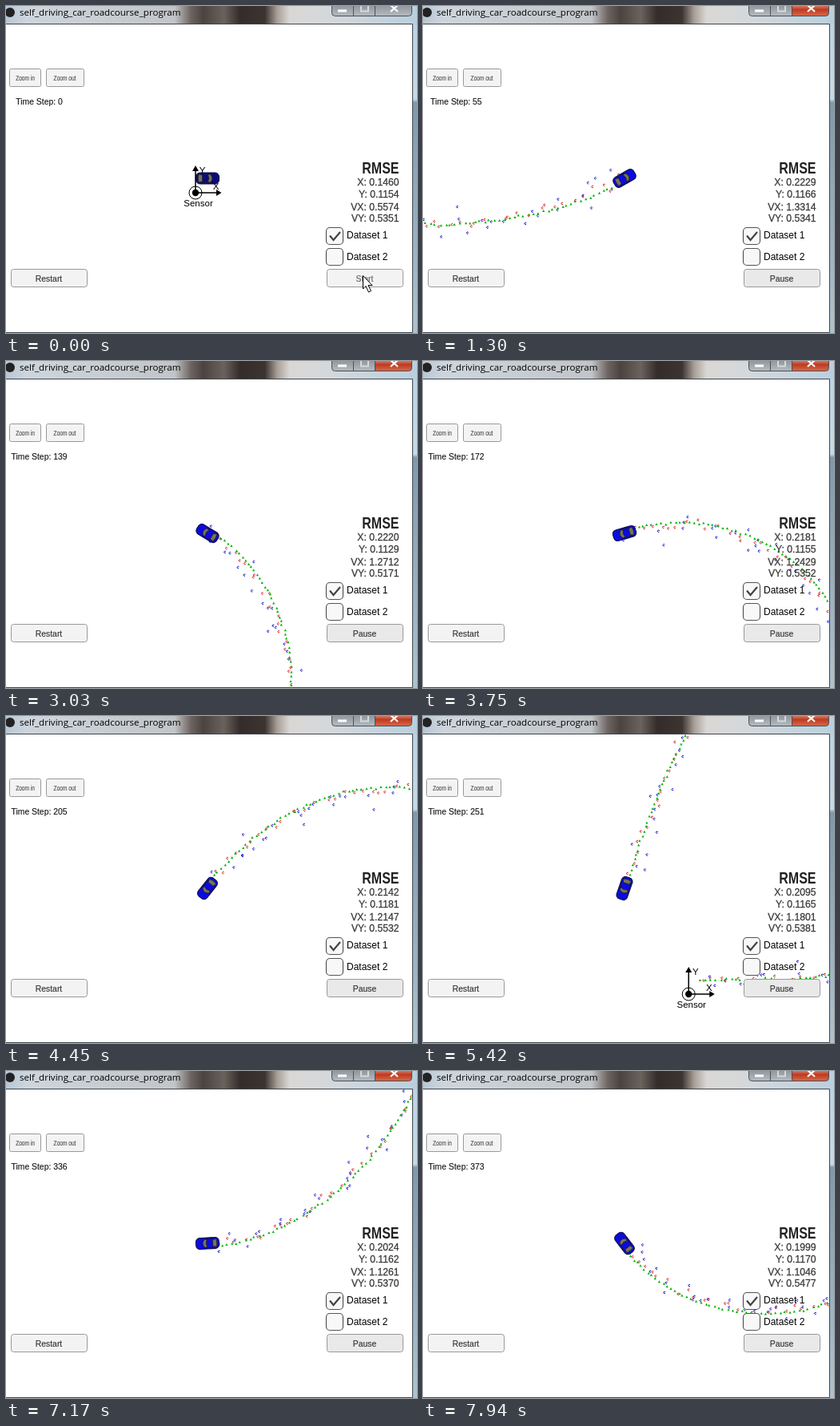
An HTML page for the animation above (7.99 s loop, 514 px wide and 408 px high).

```html
<!DOCTYPE html>
<html lang="en">
<head>
<meta charset="utf-8">
<title>Sensor fusion simulator</title>
<style>
  html, body { margin: 0; width: 100%; height: 100%; overflow: hidden; background: #fff; }
  svg { display: block; width: 514px; height: 408px; }
  text { font-family: "Liberation Sans", Arial, sans-serif; }
  .title { font: 11.6px "Open Sans", "Noto Sans", sans-serif; }
  .label { font-size: 10.4px; fill: #333; stroke: #333; stroke-width: .15; text-anchor: middle; }
  .small { font-size: 9.4px; fill: #505050; stroke: #505050; stroke-width: .15; text-anchor: middle; }
  .stat { font-size: 13.7px; fill: #3a3a3a; stroke: #3a3a3a; stroke-width: .3; text-anchor: end; }
  .set { font-size: 12px; }
  .btn { fill: #f3f3f3; stroke: #999; }
  .box { fill: #f8f8f8; stroke: #555; stroke-width: 1.2; }
  .dot { fill: none; stroke-width: 1; }
</style>
</head>
<body>
<svg viewBox="0 0 514 408" xmlns="http://www.w3.org/2000/svg">
  <defs>
    <linearGradient id="glass">
      <stop offset="0" stop-color="#b7c6d4"/>
      <stop offset=".05" stop-color="#cdd5dc"/>
      <stop offset=".41" stop-color="#c2c5c8"/>
      <stop offset=".45" stop-color="#6d6460"/>
      <stop offset=".48" stop-color="#4b4340"/>
      <stop offset=".53" stop-color="#6b625d"/>
      <stop offset=".57" stop-color="#332c2a"/>
      <stop offset=".63" stop-color="#3c3431"/>
      <stop offset=".66" stop-color="#a89f98"/>
      <stop offset=".69" stop-color="#d9d7d5"/>
      <stop offset=".79" stop-color="#d4d8db"/>
      <stop offset="1" stop-color="#b9cfde"/>
    </linearGradient>
    <linearGradient id="edge" x2="0" y2="1">
      <stop offset="0" stop-color="#b9d2e4"/>
      <stop offset=".285" stop-color="#c6d9e6"/>
      <stop offset=".295" stop-color="#7f99ac"/>
      <stop offset="1" stop-color="#afc2cf"/>
    </linearGradient>
    <linearGradient id="red" x2="0" y2="1">
      <stop offset="0" stop-color="#d98873"/>
      <stop offset=".4" stop-color="#bd3b22"/>
      <stop offset="1" stop-color="#d8694a"/>
    </linearGradient>
    <linearGradient id="grey" x2="0" y2="1">
      <stop offset="0" stop-color="#8e959b"/>
      <stop offset="1" stop-color="#b5bbc0"/>
    </linearGradient>
    <clipPath id="view"><path d="M0 23H508V407H0z"/></clipPath>
  </defs>

  <rect width="514" height="408" fill="url(#edge)"/>
  <rect width="514" height="23" fill="url(#glass)"/>
  <circle cx="5" cy="8" r="6" fill="#222"/>
  <text class="title" x="17" y="12">self_driving_car_roadcourse_program</text>

  <g stroke="#4b5157">
    <path d="M407.5 -1H434.5V12.5H411.5Q407.5 12.5 407.5 8.5z" fill="url(#grey)"/>
    <path d="M434.5 -1H461.5V12.5H434.5z" fill="url(#grey)"/>
    <path id="close" d="M461.5 -1H507.5V8.5Q507.5 12.5 503.5 12.5H461.5z"/>
  </g>
  <path d="M415 6h11" stroke="#fff" stroke-width="3"/>
  <path d="M444 -1V6.5h9V-1" fill="none" stroke="#d5d9dc" stroke-width="2"/>
  <path d="M481 -1l9 8m0 -8l-9 8" stroke="#fff" stroke-width="2.2"/>

  <path d="M0 23H508V407H0z" fill="#fff"/>
  <path d="M0 22.5H508.5V407.5H0" fill="none" stroke="#3f474d"/>

  <g clip-path="url(#view)">
    <g id="world">
      <path id="radar" class="dot" stroke="#0000c8"/>
      <path id="lidar" class="dot" stroke="#d01010"/>
      <path id="track" fill="#00b400"/>
    </g>
    <g id="car">
      <rect id="body" x="-14.5" y="-7" width="29" height="14" rx="5" stroke="#0a0a40"/>
      <path d="M3 -5.5Q9 0 3 5.5L.5 4Q3 0 .5 -4zM-11 -5Q-12.500 0 -11 5L-6.500 4V-4z" fill="#77725c" stroke="#222" stroke-width=".8"/>
      <path d="M-8 -5.500H4M-8 5.500H4" stroke="#15154a"/>
    </g>
    <g id="sensor">
      <circle r="8" fill="none" stroke="#000"/>
      <circle r="4.2"/>
      <path d="M0 0V-29M0 0H28" stroke="#000" stroke-width="1.5"/>
      <path d="M-4 -27L0 -34L4 -27zM26 -4L32.5 0L26 4z"/>
      <text x="8.5" y="-24" font-size="11.5" text-anchor="middle">Y</text>
      <text x="25.5" y="-4" font-size="11.5" text-anchor="middle">X</text>
      <text x="3.5" y="17" font-size="11.5" text-anchor="middle">Sensor</text>
    </g>
  </g>

  <rect class="btn" x="4.5" y="78.5" width="39" height="22" rx="2"/>
  <rect class="btn" x="50.5" y="78.5" width="47" height="22" rx="2"/>
  <text class="small" transform="translate(24 92.5) scale(.7 1)">Zoom in</text>
  <text class="small" transform="translate(73.5 92.5) scale(.7 1)">Zoom out</text>
  <text id="clock" class="label" x="41.5" y="123" style="fill:#111"></text>

  <rect class="btn" x="6.5" y="328.5" width="95" height="22" rx="3"/>
  <text class="label" x="53.5" y="344">Restart</text>
  <rect id="runBox" class="btn" x="401.5" y="328.5" width="95" height="22" rx="3"/>
  <text id="run" class="label" x="448.5" y="344"></text>

  <text transform="translate(491.5 209) scale(.8 1)" font-size="20" font-weight="700" text-anchor="end" fill="#222">RMSE</text>
  <g id="stats"></g>

  <rect class="box" x="400.5" y="276.5" width="21" height="21" rx="4.5"/>
  <rect class="box" x="400.5" y="302.5" width="21" height="21" rx="4.5"/>
  <path d="M405 286.500l4.500 5.500l8.500 -10" fill="none" stroke="#444" stroke-width="2.2"/>
  <text class="set" x="426" y="290">Dataset 1</text>
  <text class="set" x="426" y="317">Dataset 2</text>

  <path id="cursor" d="M446.5 336.5V353L450 349.5L453.5 357L456.5 355.5L453 348.5H458z" fill="#fff" stroke="#000"/>
</svg>

<script>
const LOOP = 7990, TICK = 64.4;
const CX = 252, CY = 215;
const SCALE = 24, DT = 0.05, STEPS = 380;
const $ = id => document.getElementById(id);

// tick, time step, RMSE of x, y, vx, vy
const KNOTS = [
  [0, 0, .1460, .1154, .5574, .5351],
  [2, 0, .1460, .1154, .5574, .5351],
  [5, 9, .2480, .1090, 1.7200, .5200],
  [20, 55, .2229, .1166, 1.3314, .5341],
  [47, 139, .2220, .1129, 1.2712, .5171],
  [69, 205, .2142, .1181, 1.2147, .5532],
  [84, 251, .2095, .1165, 1.1801, .5381],
  [99, 298, .2048, .1154, 1.1477, .5263],
  [123, 373, .1999, .1170, 1.1046, .5477],
  [124, 376, .1997, .1170, 1.1030, .5470]
];

function sample(tick) {
  let i = 1;
  while (i < KNOTS.length - 1 && KNOTS[i][0] < tick) i++;
  const a = KNOTS[i - 1], b = KNOTS[i];
  const f = (tick - a[0]) / (b[0] - a[0]);
  return a.map((v, j) => v + (b[j] - v) * f);
}

// Figure eight: yaw rate .55 sin(wk), speed 5 + .2 cos(2wk)
const W = 2 * Math.PI / 500, LEAD = 0.7;
const yaw = k => 0.55 * DT / W * (1 - Math.cos(W * (k + LEAD)));
const poses = [];
for (let k = 0, x = 15, y = -18; k <= STEPS; k++) {
  poses.push({ x, y });
  const m = k + 0.5, d = (5 + 0.2 * Math.cos(2 * W * m)) * DT * SCALE;
  x += d * Math.cos(yaw(m));
  y -= d * Math.sin(yaw(m));
}

let seed = 7;
const rand = () => (seed = (seed * 16807) % 2147483647) / 2147483647;
const noise = s => s * (rand() + rand() + rand() + rand() - 2) * 1.73;
const ring = (x, y) => `M${x.toFixed(1)} ${y.toFixed(1)}m.8 1a1.2 1.2 0 1 1 .3-1.4`;
const wedge = (x, y) => `M${x.toFixed(1)} ${(y - 1.6).toFixed(1)}l1.6 3h-3.2z`;

// The estimate drifts to the outside of each bend
const marks = { track: [], lidar: [], radar: [] };
poses.forEach(({ x, y }, k) => {
  const out = 4 * Math.sin(W * k), a = yaw(k);
  marks.track.push(wedge(x + out * Math.sin(a) + noise(0.8), y + out * Math.cos(a) + noise(0.8)));
  const odd = k % 2, s = odd ? 8 : 3.6;
  marks[odd ? 'radar' : 'lidar'].push(ring(x + noise(s), y + noise(s)));
});

const stats = ['X', 'Y', 'VX', 'VY'].map((name, i) => {
  const el = document.createElementNS('http://www.w3.org/2000/svg', 'text');
  el.setAttribute('class', 'stat');
  el.setAttribute('transform', `translate(491.5 ${[223.5, 238.5, 255, 269][i]}) scale(.89 1)`);
  $('stats').append(el);
  return { name, el };
});

const move = (id, x, y, turn = 0) =>
  $(id).setAttribute('transform', `translate(${x.toFixed(2)} ${y.toFixed(2)}) rotate(${turn.toFixed(2)})`);

function draw(tick) {
  const [, raw, ...rmse] = sample(tick);
  const k = Math.round(raw), p = poses[k], on = tick > 0;

  move('world', CX - p.x, CY - p.y);
  move('sensor', CX - p.x, CY - p.y);
  move('car', CX, CY, -yaw(k) * 180 / Math.PI);
  $('body').setAttribute('fill', k ? '#0b0be0' : '#0c0c78');

  $('track').setAttribute('d', marks.track.slice(0, k).join(''));
  $('lidar').setAttribute('d', marks.lidar.slice(0, Math.ceil(k / 2)).join(''));
  $('radar').setAttribute('d', marks.radar.slice(0, Math.floor(k / 2)).join(''));

  $('clock').textContent = 'Time Step: ' + k;
  stats.forEach((s, i) => { s.el.textContent = `${s.name}: ${rmse[i].toFixed(4)}`; });

  $('run').textContent = on ? 'Pause' : 'Start';
  $('run').style.fill = on ? '#333' : '#777';
  $('runBox').style.fill = on ? '#e9e9e9' : '#f3f3f3';
  $('close').setAttribute('fill', on ? 'url(#red)' : 'url(#grey)');
  $('cursor').style.display = on ? 'none' : '';
}

const start = performance.now();
let last = -1;
function loop() {
  const t = (performance.now() - start) % LOOP;
  const tick = Math.min(123, Math.floor(t / TICK + 0.1));
  if (tick !== last) draw(last = tick);
  requestAnimationFrame(loop);
}
loop();
</script>
</body>
</html>
```
